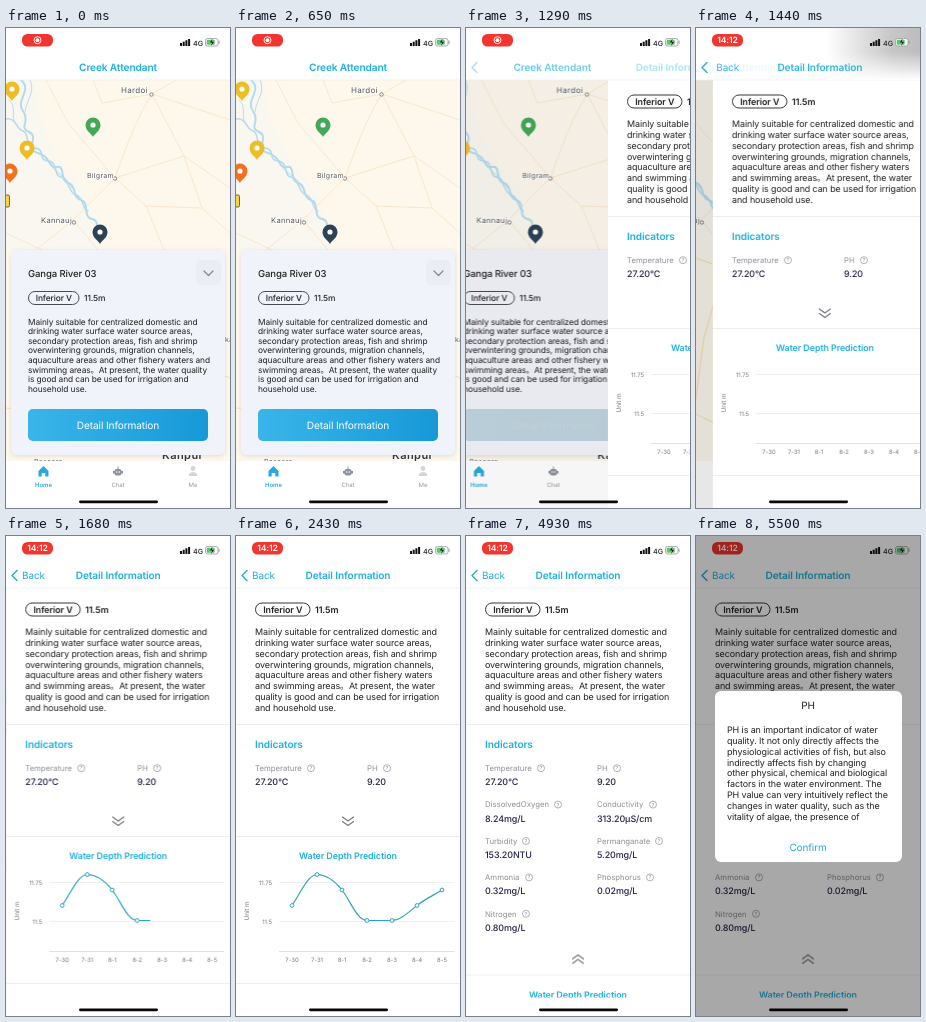
These frames come from a looping animation (224 by 480 pixels, 5.55 s). An HTML page:

```html
<!DOCTYPE html>
<html lang="en">
<head>
<meta charset="utf-8">
<title>Water quality app</title>
<style>
html, body { margin: 0; width: 100%; height: 100%; overflow: hidden; background: #fff; }
svg { display: block; width: 224px; height: 480px; }
text {
  font-family: Inter, "Liberation Sans", "Noto Sans CJK SC", sans-serif;
  fill: #222; letter-spacing: -.012em; text-rendering: geometricPrecision;
}
.mid { text-anchor: middle; }
.title { font-size: 10.15px; font-weight: 600; fill: #1fb0dc; }
.blue { fill: #27aadc; }
.semi { font-weight: 600; }
.medium { font-weight: 500; }
.place { font-size: 7.6px; fill: #555; stroke: #fff; stroke-width: 1.5px; paint-order: stroke; letter-spacing: .04em; }
.tab { font-size: 6px; fill: #999; text-anchor: middle; }
.axis { font-size: 6px; fill: #777; }
.label { font-size: 7.77px; fill: #8e9095; letter-spacing: 0; }
.value { font-size: 8.96px; font-weight: 500; fill: #23234a; }
.line { fill: none; stroke-linecap: round; stroke-linejoin: round; }
.rule { stroke: #eceef0; }

.push, .press, .before, .after, .draw, .expand, .flip, .reveal, .shade, .modal {
  animation: 5550ms linear infinite;
}
.push { animation-name: push; }
.press { animation-name: press; }
.before { animation-name: before; animation-timing-function: step-end; }
.after { animation-name: after; animation-timing-function: step-end; }
.draw { animation-name: draw; transform-origin: 50px 0; }
.expand { animation-name: expand; animation-timing-function: step-end; }
.flip { animation-name: flip; animation-timing-function: step-end; transform-origin: 112px 285px; }
.reveal { animation-name: reveal; animation-timing-function: step-end; }
.shade { animation-name: shade; }
.modal { animation-name: modal; }

@keyframes push {
  0%, 22.34% {
    transform: translateX(var(--x0, 0px)); opacity: var(--o0, 1);
    animation-timing-function: cubic-bezier(.2833, .99, .3183, .99);
  }
  30.81%, 100% { transform: translateX(var(--x1, 0px)); opacity: var(--o1, 1); }
}
@keyframes press { 0%, 18.74% { opacity: 1; } 21.4%, 100% { opacity: .06; } }
@keyframes before { 0% { opacity: 1; } 24.14%, 100% { opacity: 0; } }
@keyframes after { 0% { opacity: 0; } 24.14%, 100% { opacity: 1; } }
@keyframes draw {
  0%, 26.13% { transform: scaleX(0); animation-timing-function: cubic-bezier(.215, .61, .355, 1); }
  43.6%, 100% { transform: scaleX(1); }
}
@keyframes expand { 0% { transform: none; } 59.46%, 100% { transform: translateY(138.5px); } }
@keyframes flip { 0% { transform: none; } 59.46%, 100% { transform: rotate(180deg); } }
@keyframes reveal { 0% { opacity: 0; } 59.46%, 100% { opacity: 1; } }
@keyframes shade { 0%, 23.5% { opacity: 0; } 25.5%, 26.5% { opacity: 1; } 28.5%, 100% { opacity: 0; } }
@keyframes modal {
  0%, 91.53% { opacity: 0; animation-timing-function: ease-out; }
  96.94%, 100% { opacity: 1; }
}
</style>
</head>
<body>
<svg viewBox="0 0 224 480">
  <defs>
    <linearGradient id="action"><stop stop-color="#39b5e9"/><stop offset="1" stop-color="#1799d8"/></linearGradient>
    <linearGradient id="corner"><stop stop-opacity="0"/><stop offset=".7" stop-opacity=".22"/><stop offset="1" stop-opacity=".26"/></linearGradient>
    <linearGradient id="fade" x2="0" y2="1"><stop stop-color="#fff" stop-opacity="0"/><stop offset="1" stop-color="#fff"/></linearGradient>
    <filter id="soft" x="-20%" y="-20%" width="140%" height="140%">
      <feDropShadow dx="0" dy="1" stdDeviation="2" flood-color="#50607a" flood-opacity=".18"/>
    </filter>
    <clipPath id="mapArea"><path d="M0 52H224V433H0Z"/></clipPath>
    <clipPath id="wipe"><rect class="draw" x="50" y="325" width="162" height="75"/></clipPath>
    <g id="pin">
      <path d="M0 11C-2 7-7.5 5-7.5-1A7.5 7.5 0 0 1 7.5-1C7.5 5 2 7 0 11Z"/>
      <circle cy="-1" r="2.6" fill="#fff"/>
    </g>
  </defs>
  <rect width="224" height="480" fill="#fff"/>

  <!-- Home -->
  <g class="push" style="--x1:-67.2px">
    <g clip-path="url(#mapArea)">
      <rect y="52" width="224" height="381" fill="#fdf7ec"/>
      <path d="M0 52H26C32 90 40 118 62 142S88 190 94 222H0Z" fill="#f9f7ef"/>
      <g class="line" stroke="#f8e8cb">
        <path d="M146 66L170 52M146 66L224 92M146 66L178 128L224 160M146 66C130 90 118 125 109 150L67 192L30 222"/>
        <path d="M109 150L140 178L158 222M109 150L178 128M67 192L92 222M87 52L96 75L146 66M40 52L62 95L109 150"/>
        <path d="M178 128L196 180L224 205M140 178L196 180M0 205L36 222"/>
        <path d="M40 222L90 240L130 310L224 350M0 380L60 385L100 405L170 425M90 240L70 310L60 385" stroke="#f7dfae"/>
      </g>
      <g class="line" stroke="#b3daef">
        <path d="M15 52C27 62 9 72 17 83S12 99 23 104S18 121 32 125S42 141 51 139S53 153 62 155S66 170 75 172S76 189 86 191S86 204 94 209" stroke-width="2"/>
        <path d="M0 91C10 89 10 101 17 103S18 119 29 120S31 132 42 133S47 148 55 149S62 165 70 167S76 182 82 183" stroke-width="1.5"/>
        <path d="M3 72C12 78 3 90 11 97M24 52C30 64 20 72 19 84M42 133C47 145 60 146 66 160" stroke-width=".9"/>
      </g>
      <rect x="-3" y="167" width="6.500" height="12" rx="1.500" fill="#f8d443" stroke="#4b4430" stroke-width=".8"/>
      <g fill="#fff" stroke="#666" stroke-width=".8">
        <circle cx="145.500" cy="66.500" r="1.7"/><circle cx="109" cy="150.500" r="1.7"/><circle cx="68" cy="194.500" r="1.7"/>
      </g>
      <text class="place" x="115" y="65" style="font-size:8px">Hardoi</text>
      <text class="place" x="81" y="150" style="font-size:7px">Bilgram</text>
      <text class="place" x="35" y="195">Kannauj</text>
      <text class="place" x="219" y="314" style="font-size:7px">ka</text>
      <text class="place" x="28" y="436" style="font-size:7px">Rasoara</text>
      <text class="place semi" x="156" y="431" style="font-size:11px;fill:#333">Kanpur</text>
      <use href="#pin" x="6" y="62" fill="#eebd25"/>
      <use href="#pin" x="87" y="98" fill="#43a857"/>
      <use href="#pin" x="21" y="121" fill="#eebd25"/>
      <use href="#pin" x="4" y="144" fill="#f3701f"/>
      <use href="#pin" x="94" y="205" fill="#2b4258"/>
    </g>

    <g class="before">
      <rect x="5" y="222" width="214" height="205" rx="6" fill="#f0f3f9" filter="url(#soft)"/>
      <text class="medium" x="22" y="249" font-size="9.56">Ganga River 03</text>
      <rect x="190" y="232" width="25" height="25" rx="5" fill="#eaeef4"/>
      <path class="line" d="M198 243L202.500 247.500L207 243" stroke="#7b8799" stroke-width="1.200"/>
      <rect x="22.500" y="263.500" width="50.500" height="13" rx="6.500" fill="none" stroke="#4a4c55"/>
      <text class="mid medium" x="47.800" y="273" font-size="8.4">Inferior V</text>
      <text class="medium" x="78" y="273" font-size="8.4">11.5m</text>
      <text data-lines="22 296.500 9.6" font-size="8.36">Mainly suitable for centralized domestic and
drinking water surface water source areas,
secondary protection areas, fish and shrimp
overwintering grounds, migration channels,
aquaculture areas and other fishery waters and
swimming areas。At present, the water quality
is good and can be used for irrigation and
household use.</text>
      <rect x="22" y="381" width="180" height="32" rx="5" fill="#c8d6df"/>
      <g class="press">
        <rect x="22" y="381" width="180" height="32" rx="5" fill="url(#action)"/>
        <text class="mid" x="112" y="401" font-size="10.15" style="fill:#fff">Detail Information</text>
      </g>
    </g>

    <rect y="433" width="224" height="47" fill="#fff"/>
    <path d="M32.500 443L37.500 438L42.500 443V448.500H39.300V445H35.700V448.500H32.500Z" fill="#26a8e0"/>
    <g fill="#8c9299">
      <rect x="108.500" y="441" width="7" height="6.500" rx="2"/>
      <path d="M107 443H117V445.500H107ZM111.500 438.500H112.500V441H111.500Z"/>
      <circle cx="110.700" cy="444" r=".8" fill="#fff"/><circle cx="113.300" cy="444" r=".8" fill="#fff"/>
    </g>
    <g fill="#d3d6da"><circle cx="187" cy="440.500" r="2.400"/><path d="M182.500 448C182.500 442.500 191.500 442.500 191.500 448Z"/></g>
    <text class="tab semi" x="37.500" y="459" style="fill:#26a8e0">Home</text>
    <text class="tab" x="112" y="459">Chat</text>
    <text class="tab" x="187" y="459">Me</text>
  </g>
  <rect class="push" style="--o0:0;--o1:.1" y="52" width="224" height="428"/>

  <!-- Detail -->
  <g class="push" style="--x0:224px">
    <rect y="52" width="224" height="428" fill="#fff"/>
    <rect x="19.500" y="67" width="54.500" height="13" rx="6.500" fill="none" stroke="#33363f"/>
    <text class="mid semi" x="46.800" y="76.700" font-size="8.96">Inferior V</text>
    <text class="semi" x="79" y="76.700" font-size="8.96">11.5m</text>
    <text data-lines="19 99.300 10.75" font-size="8.96">Mainly suitable for centralized domestic and
drinking water surface water source areas,
secondary protection areas, fish and shrimp
overwintering grounds, migration channels,
aquaculture areas and other fishery waters
and swimming areas。At present, the water
quality is good and can be used for irrigation
and household use.</text>
    <path class="rule" d="M0 188.500H224"/>
    <text class="title" x="19" y="211.500">Indicators</text>
    <g id="indicators"></g>
    <g id="more" class="reveal"></g>

    <g class="expand">
      <g class="flip"><path class="line" d="M106.500 281L112 285L117.500 281M106.500 285.500L112 289.500L117.500 285.500" stroke="#777b82" stroke-width="1.200"/></g>
      <path class="rule" d="M0 300.500H224M0 447.500H224"/>
      <text class="title mid" x="112" y="323" style="font-size:8.96px">Water Depth Prediction</text>
      <path d="M43 346.500H218M43 385.500H218" stroke="#ececee" stroke-width=".8"/>
      <path d="M43 415.500H218" stroke="#d6d8dc" stroke-width=".8"/>
      <text class="axis" x="36" y="349" text-anchor="end">11.75</text>
      <text class="axis" x="36" y="388" text-anchor="end">11.5</text>
      <text class="axis mid" transform="translate(13 375) rotate(-90)" style="font-size:6.4px">Unit m</text>
      <g id="days"></g>
      <g clip-path="url(#wipe)" stroke="#2ba3c6" stroke-width="1.200">
        <path class="line" d="M56 369.500C64 358 72 338.500 81 338.500S98 344 106 354S121 384.500 131 384.500H156C164 384.500 173 376 181 369.500S198 359 206 354"/>
        <g id="dots" fill="#fff" stroke-width="1"></g>
      </g>
    </g>
    <rect y="461.500" width="224" height="18.500" fill="#fff"/>
  </g>

  <!-- Header and status bar -->
  <rect width="224" height="52" fill="#fff"/>
  <path d="M0 52H224" stroke="#ebecee" stroke-width=".7"/>
  <g class="shade">
    <rect x="130" width="94" height="52" fill="url(#corner)"/>
    <rect x="130" y="24" width="94" height="28" fill="url(#fade)"/>
  </g>
  <text class="title mid push" style="--x1:-70px;--o1:0" x="112" y="43">Creek Attendant</text>
  <text class="title mid push" style="--x0:158px;--o0:0" x="112" y="43">Detail Information</text>
  <g class="push" style="--o0:0">
    <path class="line" d="M11 34.500L6 39.500L11 44.500" stroke="#27aadc" stroke-width="1.500"/>
    <text class="blue push" style="--x0:56px" x="16" y="43" font-size="10">Back</text>
  </g>
  <rect x="16" y="6" width="31" height="12.500" rx="5.500" fill="#f2352e"/>
  <g class="before">
    <circle cx="31.500" cy="12.200" r="3.500" fill="none" stroke="#fff" stroke-width=".9"/>
    <circle cx="31.500" cy="12.200" r="1.900" fill="#fff"/>
  </g>
  <text class="mid semi after" x="31.500" y="15.400" font-size="8.6" style="fill:#fff">14:12</text>
  <path d="M174 15H176V18H174ZM176.700 13.700H178.700V18H176.700ZM179.400 12.300H181.400V18H179.400ZM182.100 11H184.100V18H182.100Z" fill="#111"/>
  <text class="medium" x="187" y="17.500" font-size="7.200">4G</text>
  <rect x="199.500" y="10.500" width="12.500" height="7.500" rx="2" fill="#fff" stroke="#999" stroke-width=".8"/>
  <rect x="200.700" y="11.700" width="8" height="5.100" rx="1" fill="#4bcb60"/>
  <path d="M213 12.700V15.800" stroke="#999" stroke-width="1"/>
  <path d="M207 10L203 14.800H205.700L204.600 18.700L208.800 13.600H206.200Z" fill="#111" stroke="#fff" stroke-width=".4"/>
  <rect x="73" y="472.500" width="79" height="2.700" rx="1.350" fill="#080808"/>

  <!-- Dialog -->
  <g class="modal">
    <rect width="224" height="480" opacity=".34"/>
    <rect x="19" y="155" width="187" height="171" rx="6" fill="#fff"/>
    <text class="mid" x="112" y="173.300" font-size="10">PH</text>
    <text data-lines="31 196.800 10.9" font-size="8.96">PH is an important indicator of water
quality. It not only directly affects the
physiological activities of fish, but also
indirectly affects fish by changing
other physical, chemical and biological
factors in the water environment. The
PH value can very intuitively reflect the
changes in water quality, such as the
vitality of algae, the presence of</text>
    <text class="mid blue" x="112" y="314.700" font-size="10">Confirm</text>
  </g>
</svg>
<script>
const byId = id => document.getElementById(id);

// Break each paragraph into lines: x, first baseline, line height.
document.querySelectorAll('[data-lines]').forEach(el => {
  const [x, y, step] = el.dataset.lines.split(' ').map(Number);
  el.innerHTML = el.textContent.split('\n')
    .map((line, i) => `<tspan x="${x}" y="${y + i * step}">${line}</tspan>`).join('');
});

// Name, value, centre of the help mark.
const indicators = [
  ['Temperature', '27.20°C', 75], ['PH', '9.20', 151],
  ['DissolvedOxygen', '8.24mg/L', 92], ['Conductivity', '313.20µS/cm', 187],
  ['Turbidity', '153.20NTU', 60], ['Permanganate', '5.20mg/L', 193],
  ['Ammonia', '0.32mg/L', 63], ['Phosphorus', '0.02mg/L', 184],
  ['Nitrogen', '0.80mg/L', 60]
];
const cell = ([name, value, help], i) => {
  const x = i % 2 ? 131 : 19, y = 235 + Math.floor(i / 2) * 36.4;
  return `<text class="label" x="${x}" y="${y}">${name}</text>
    <circle cx="${help}" cy="${y - 2.8}" r="3.5" fill="none" stroke="#8e9095" stroke-width=".7"/>
    <text class="label mid" x="${help}" y="${y - .8}" style="font-size:5.6px">?</text>
    <text class="value" x="${x}" y="${y + 14.2}">${value}</text>`;
};
const cells = indicators.map(cell);
byId('indicators').innerHTML = cells.slice(0, 2).join('');
byId('more').innerHTML = cells.slice(2).join('');

const depths = [369.5, 338.5, 354, 384.5, 384.5, 369.5, 354];
const days = ['7-30', '7-31', '8-1', '8-2', '8-3', '8-4', '8-5'];
const dayX = i => 56 + i * 25;
byId('days').innerHTML = days.map((d, i) => `<text class="axis mid" x="${dayX(i)}" y="426">${d}</text>`).join('');
byId('dots').innerHTML = depths.map((y, i) => `<circle cx="${dayX(i)}" cy="${y}" r="1.9"/>`).join('');
</script>
</body>
</html>
```
